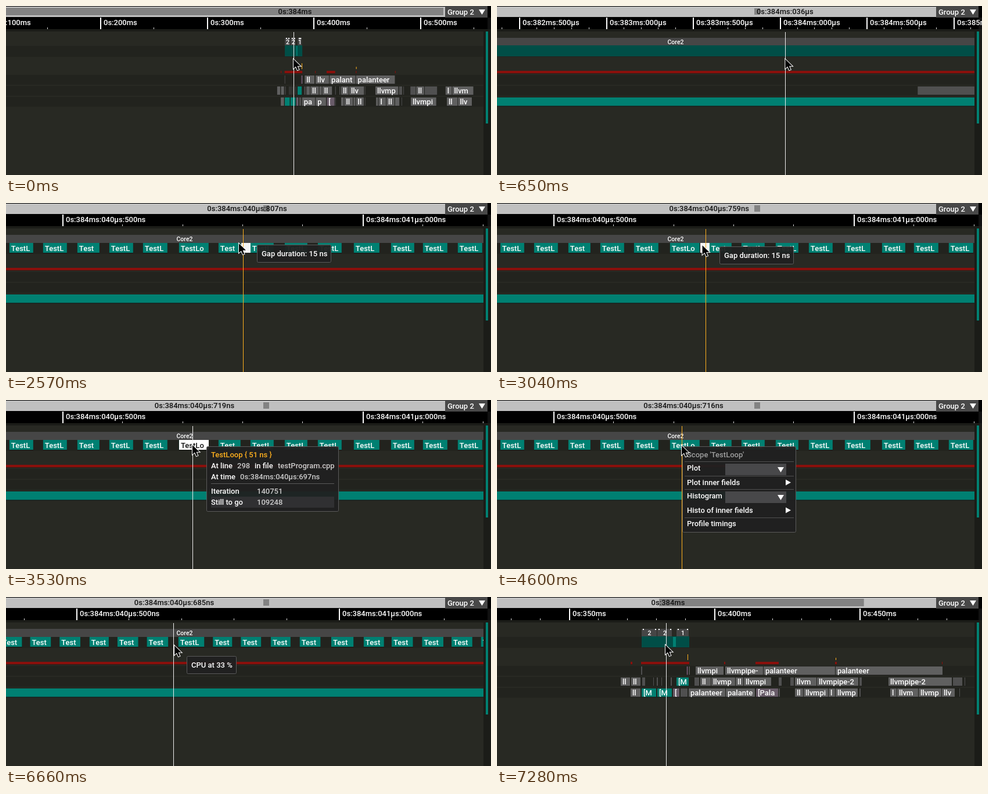
Recreate the animation shown at these times as an HTML page with a canvas. Size 835 by 292 pixels, loop 7.35 s.

```html
<!DOCTYPE html>
<html lang="en">
<head>
<meta charset="utf-8">
<title>Timeline zoom</title>
<style>
html, body { margin: 0; height: 100%; overflow: hidden; background: #1b1c18; }
canvas { display: block; }
</style>
</head>
<body>
<canvas id="stage" width="835" height="292"></canvas>
<script>
const ctx = document.getElementById('stage').getContext('2d');
const LOOP = 7350, VIEW = 822, TEAL = '#008072', ORANGE = '#ffb01e';
const FONT = '500 13px Roboto, sans-serif';

const burst = (start, count, gap) => Array.from({ length: count }, (_, i) => start + i * gap);
const ticks = [
  ...burst(370, 11, 70), ...burst(1140, 2, 60), ...burst(2160, 11, 68), ...burst(2900, 10, 70),
  3930, 4000, 4600, 5460, 5530, 5660, 5990, ...burst(6660, 10, 68.8)
];

// Mouse path: tick, x, y. The label lags one tick behind the line, the arrow leads by one.
const path = [
  [-1, 497.5, 92], [0, 495, 92], [1, 495, 92], [12, 498, 92], [13, 488, 88], [14, 477, 83],
  [19, 415, 72], [20, 408, 71], [21, 401, 70], [24, 373, 70], [25, 371, 71], [33, 324.5, 77],
  [34, 321, 78], [35, 321, 78], [36, 318, 79], [37, 318, 79], [40, 289.5, 84], [41, 289.5, 84],
  [42, 288, 84], [43, 290, 84], [50, 294.5, 83], [51, 291, 83], [52, 290, 83]
];
const menuArrow = { 38: [334, 139], 39: [340, 145], 40: [276, 92] };

function mouse(s) {
  const i = Math.max(1, path.findIndex(p => p[0] >= s));
  const [a, b] = [path[i - 1], path[i]];
  const k = (s - a[0]) / (b[0] - a[0]);
  return { x: a[1] + (b[1] - a[1]) * k, y: a[2] + (b[2] - a[2]) * k };
}

// View: time `t` (ns) sits at pixel `x`, `scale` is pixels per ns.
const T0 = 384040500, FINE = 1.034;
const mix = (a, b, k) => a + (b - a) * k;
const mixLog = (a, b, k) => a * Math.pow(b / a, k);
function viewAt(s) {
  if (s <= 41) {
    const k = Math.min(1, s / 13);
    return { t: T0 + 387, x: mix(497, 498, k), scale: mixLog(1.835e-6, FINE, k), ruler: 4 * (1 - k) };
  }
  const k = ((s - 41) / 10 - 0.09) / 0.91;
  return { t: T0 + 184, x: mix(288.2, 295.2, k), scale: mixLog(FINE, 5e-6, k), ruler: 0 };
}
const toX = (v, t) => v.x + (t - v.t) * v.scale;
const toT = (v, x) => v.t + (x - v.x) / v.scale;
const coarse = u => 325e6 + u * 2e5;
const fine = u => T0 + (u - 98) / FINE;

function rect(x, y, w, h, color) {
  ctx.fillStyle = color;
  ctx.fillRect(x, y, w, h);
}
function text(str, x, y, color = '#fff', align = 'left') {
  ctx.fillStyle = color;
  ctx.textAlign = align;
  ctx.fillText(str, x, y);
}
function triangle(x, y, r, down, color = '#fff') {
  ctx.fillStyle = color;
  ctx.beginPath();
  if (down) { ctx.moveTo(x - r, y - r + 1); ctx.lineTo(x + r, y - r + 1); ctx.lineTo(x, y + r - 1); }
  else { ctx.moveTo(x - r + 1, y - r); ctx.lineTo(x - r + 1, y + r); ctx.lineTo(x + r, y); }
  ctx.fill();
}
function panel(x, y, w, h) {
  ctx.beginPath();
  ctx.roundRect(x + 0.5, y + 0.5, w - 1, h - 1, 2);
  ctx.fillStyle = 'rgba(32,32,32,.95)';
  ctx.fill();
  ctx.strokeStyle = '#5a5a5a';
  ctx.lineWidth = 1;
  ctx.stroke();
}

function formatTime(t, unit) {
  const n = Math.round(t / unit) * unit;
  const part = size => String(Math.floor(n / size) % 1000).padStart(3, '0');
  let out = '0s:' + part(1e6) + 'ms';
  if (unit < 1e6) out += ':' + part(1e3) + 'µs';
  if (unit < 1e3) out += ':' + part(1) + 'ns';
  return out;
}

function box(x0, x1, y, h, color, label = '', ink = '#fff') {
  if (x1 < 0 || x0 > VIEW) return;
  const left = Math.max(x0, -500), w = Math.min(x1, VIEW + 500) - left;
  rect(left, y, Math.max(1, w - 1), h, 'rgba(0,0,0,.35)');
  rect(left, y, Math.max(1, w - 1), h - 1, color);
  while (label && ctx.measureText(label).width > x1 - x0 - 7) label = label.slice(0, -1);
  if (label) text(label, x0 + 3, y + h - 4, ink);
}

// Thread rows: start, end, kind.
const kinds = {
  l: ['#606060', 'llvmpipe-2'], p: ['#606060', 'palanteer'], t: [TEAL, '[Main]'],
  v: ['#695c69', '[Palanteer]'], k: ['#a679a6'], g: ['#505050']
};
const rows = [
  [120, [[248, 251, 'g'], [327, 329, 'k'], [330, 333, 'g'], [342, 391, 'l'], [393, 459, 'l'],
    [459, 583, 'p'], [583, 768, 'p']]],
  [139, [[213, 230, 'l'], [231, 248, 'l'], [250, 256, 'g'], [269, 271, 'g'], [275, 278, 'g'],
    [283, 285, 'g'], [299, 302, 'g'], [309, 331, 't'], [340, 349, 'g'], [350, 369, 'l'], [369, 411, 'l'],
    [411, 425, 'l'], [425, 473, 'l'], [485, 491, 'g'], [505, 512, 'g'], [513, 551, 'l'], [551, 623, 'l'],
    [624, 629, 'g'], [674, 784, 'l'], [785, 802, 'g'], [805, 807, 'g'], [838, 866, 'g'], [866, 905, 'l'],
    [905, 966, 'g'], [1003, 1035, 'l'], [1035, 1136, 'l']]],
  [158, [[230, 248, 'l'], [249, 275, 't'], [276, 302, 't'], [303, 315, 'v'], [316, 329, 'g'],
    [330, 394, 'p'], [394, 445, 'p'], [446, 485, 'v'], [485, 488, 'g'], [513, 528, 'l'], [528, 571, 'l'],
    [571, 583, 'l'], [583, 622, 'l'], [624, 627, 'g'], [677, 689, 'l'], [689, 726, 'l'], [726, 766, 'l'],
    [766, 789, 'l'], [796, 798, 'g'], [840, 962, 'l'], [1009, 1062, 'l'], [1062, 1129, 'l']]]
];

// Loop scopes repeat with a fixed pattern.
const PERIOD = 830;
const starts = [6, 64, 123, 178, 236, 298, 366, 421, 480, 537, 599, 663, 718, 778];
const widths = [41, 41, 38, 41, 42, 51, 38, 40, 39, 41, 44, 40, 42, 42];

function drawRuler(v) {
  rect(0, 20, 829, 20, '#000');
  let step = 1, next = 5;
  while (step * v.scale < 140) { step *= next; next = next === 5 ? 2 : 5; }
  const minor = step / (next === 5 ? 2 : 5);
  const unit = step >= 1e6 ? 1e6 : step >= 1e3 ? 1e3 : 1;
  const first = Math.floor(toT(v, -200) / minor);
  for (let i = first; ; i++) {
    const x = Math.round(toX(v, i * minor) + v.ruler);
    if (x > VIEW + 2) break;
    if (i * minor % step === 0) {
      rect(x - 1, 20, 2, 20, '#fff');
      text(formatTime(i * minor, unit), x + 5, 33);
    } else rect(x - 1, 37, 1, 3, '#ddd');
  }
  return unit;
}

function drawTopBar(v, label, x) {
  const barX = t => (t / 1e6 - 127) * 1.743;
  let a = barX(toT(v, 0)), b = barX(toT(v, VIEW));
  a -= 0.23 * (b - a);
  if (b - a < 10) { a = 443; b = 453; }
  a = Math.max(0, a);
  b = Math.min(753, b);
  rect(0, 0, 756, 20, '#000');
  rect(0, 1, 756, 18, '#c0c0c0');
  rect(a, b - a > 11 ? 3 : 4, b - a, b - a > 11 ? 13 : 11, '#828282');
  text(label, x, 14, '#111', 'center');
  rect(756, 0, 79, 20, '#000');
  rect(756, 0, 73, 20, '#484848');
  text('Group 2', 760, 15);
  triangle(819.5, 10.5, 5.5, true);
}

function drawLoops(v) {
  const lo = Math.max(0, toX(v, coarse(249))), hi = Math.min(VIEW, toX(v, coarse(331)));
  if (v.scale * 56 < 8) {
    rect(lo, 68, hi - lo, 19, '#004e47');
    const x = toX(v, coarse(303));
    rect(x, 69, v.scale * 1e6, 17, TEAL);
    return;
  }
  const cell = t => 98 + (t - T0) * FINE;
  const from = Math.floor(cell(toT(v, 0)) / PERIOD) - 1, to = Math.ceil(cell(toT(v, VIEW)) / PERIOD);
  for (let n = from; n <= to; n++) {
    starts.forEach((start, i) => {
      const u = start + n * PERIOD;
      box(toX(v, fine(u)), toX(v, fine(u + widths[i] + 1)), 69, 18, TEAL, 'TestLoop');
    });
  }
}

function drawTracks(v) {
  ctx.save();
  ctx.beginPath();
  ctx.rect(0, 40, VIEW, 252);
  ctx.clip();
  rect(0, 40, VIEW, 252, '#282923');
  rect(0, 40, VIEW, 4, '#1b1c18');
  for (const [y, h] of [[69, 19], [119, 17], [138, 17], [157, 17]]) rect(0, y, VIEW, h, '#22231e');

  for (const [a, b, core] of [[249, 276, 2], [276, 302, 2], [309, 331, 1]]) {
    const x = toX(v, coarse(a)), end = toX(v, coarse(b)), w = end - x;
    if (end < 0 || x > VIEW) continue;
    const left = Math.max(0, x);
    rect(left, 55, Math.min(VIEW, end) - left - (w < VIEW ? 1 : 0), 14, '#464646');
    ctx.font = '500 10.5px Roboto, sans-serif';
    text(w > 60 ? 'Core' + core : core, w > VIEW ? 307.5 : x + w / 2, 66, '#fff', 'center');
    ctx.font = FONT;
    if (w < 60) {
      rect(x + 2, 55, 2, 2, '#fff');
      rect(end - 4, 55, 2, 2, '#fff');
    }
  }
  drawLoops(v);

  for (const [a, b] of [[230, 233], [248, 331], [391, 393], [445, 485], [582, 585], [766, 767]]) {
    const x = Math.max(0, toX(v, coarse(a))), end = Math.min(VIEW, toX(v, coarse(b)));
    if (end > x) {
      rect(x, 112, Math.max(1, end - x), 4, '#8b100c');
      rect(x, 116, Math.max(1, end - x), 1, '#3a1a15');
    }
  }
  for (const [u, y, h] of [[328, 99, 10], [583, 105, 4]]) rect(toX(v, coarse(u)), y, 1, h, ORANGE);

  for (const [y, spans] of rows) {
    for (const [a, b, kind] of spans) {
      box(toX(v, coarse(a)), toX(v, coarse(b)), y, 15.5, ...kinds[kind]);
    }
  }
  ctx.restore();
  rect(VIEW, 40, 13, 252, '#1b1c18');
  rect(829, 20, 6, 20, '#111');
  rect(826, 44, 4, 159, TEAL);
}

function drawScopeTip(x, y, i) {
  panel(x, y, 228, 113);
  rect(x + 8, y + 87, 212, 19, '#303032');
  text(`TestLoop { ${widths[i]} ns }`, x + 8, y + 19, ORANGE);
  text('At line', x + 8, y + 38);
  text('298', x + 53, y + 38, '#ccc');
  text('in file', x + 83, y + 38);
  text('testProgram.cpp', x + 123, y + 38, '#ccc');
  text('At time', x + 8, y + 57);
  text(formatTime(fine(starts[i]) + 4, 1), x + 58, y + 57, '#ccc');
  rect(x + 8, y + 64, 212, 1, '#5a5a5a');
  text('Iteration', x + 8, y + 82);
  text(140746 + i, x + 87, y + 82, '#ccc');
  text('Still to go', x + 8, y + 101);
  text(109253 - i, x + 87, y + 101, '#ccc');
}

function drawHover(hoverX, x, y) {
  const i = starts.findLastIndex(start => hoverX >= start);
  const end = starts[i] + widths[i] + 1;
  if (hoverX < end) {
    box(starts[i], end, 69, 18, '#fff', 'TestLoop', '#111');
    drawScopeTip(x, y, i);
  } else {
    const gap = starts[i + 1] - end;
    rect(end, 69, gap, 17, '#f4f4f4');
    panel(x, y, 128, 31);
    text(`Gap duration: ${Math.round(gap / FINE)} ns`, x + 8, y + 20);
  }
}

function comboRow(label, x, y) {
  text(label, x, y);
  rect(x + 66, y - 12, 105, 20, '#48484a');
  triangle(x + 161.5, y - 1.5, 5.5, true);
}

function drawMenu(s) {
  panel(319, 80, 196, 149);
  for (const y of [106, 131, 154, 203]) rect(323, y, 188, 1, '#505050');
  text("Scope 'TestLoop'", 327, 99, '#a0a0a0');
  comboRow('Plot', 327, 122);
  if (s >= 38) rect(323, 133, 188, 19, '#999');
  text('Plot inner fields', 327, 147);
  triangle(501, 142.5, 5, false);
  comboRow('Histogram', 327, 170);
  text('Histo of inner fields', 327, 195);
  triangle(501, 190.5, 5, false);
  text('Profile timings', 327, 218);
  if (s >= 39) {
    panel(511, 133, 193, 58);
    comboRow('Iteration', 519, 153);
    comboRow('Still to go', 519, 177);
  }
}

const arrow = new Path2D('M0 0V16L4 12.5L6.8 19L9.3 18L6.6 11.7H12Z');
function drawArrow(x, y) {
  ctx.save();
  ctx.translate(x, y);
  ctx.lineWidth = 2;
  ctx.strokeStyle = '#fff';
  ctx.stroke(arrow);
  ctx.fillStyle = '#000';
  ctx.fill(arrow);
  ctx.restore();
}

function draw(time) {
  const s = ticks.filter(t => t <= time).length;
  const v = viewAt(s);
  const held = s > 36 && s < 41 ? 36 : s;
  const label = mouse(held - 1), line = mouse(held), tip = mouse(held + 1);
  ctx.font = FONT;
  drawTracks(v);
  const unit = drawRuler(v);
  drawTopBar(v, formatTime(toT(v, label.x), unit), label.x);

  const white = s < 12 || s === 34 || s > 40;
  const drawLine = () => rect(Math.round(line.x), 45, 1, 247, white ? '#eee' : ORANGE);
  if (s >= 14 && s <= 36) drawHover(label.x, Math.round(line.x) + 24, Math.round(tip.y) + 2);
  drawLine();
  if (s >= 37 && s <= 40) drawMenu(s);
  if (s === 41 || s === 42) {
    panel(311, 102, 86, 31);
    text('CPU at 33 %', 319, 122);
  }
  drawArrow(...(menuArrow[s] || [tip.x, tip.y]));
}

function frame() {
  draw(performance.now() % LOOP);
  requestAnimationFrame(frame);
}
frame();
</script>
</body>
</html>
```
